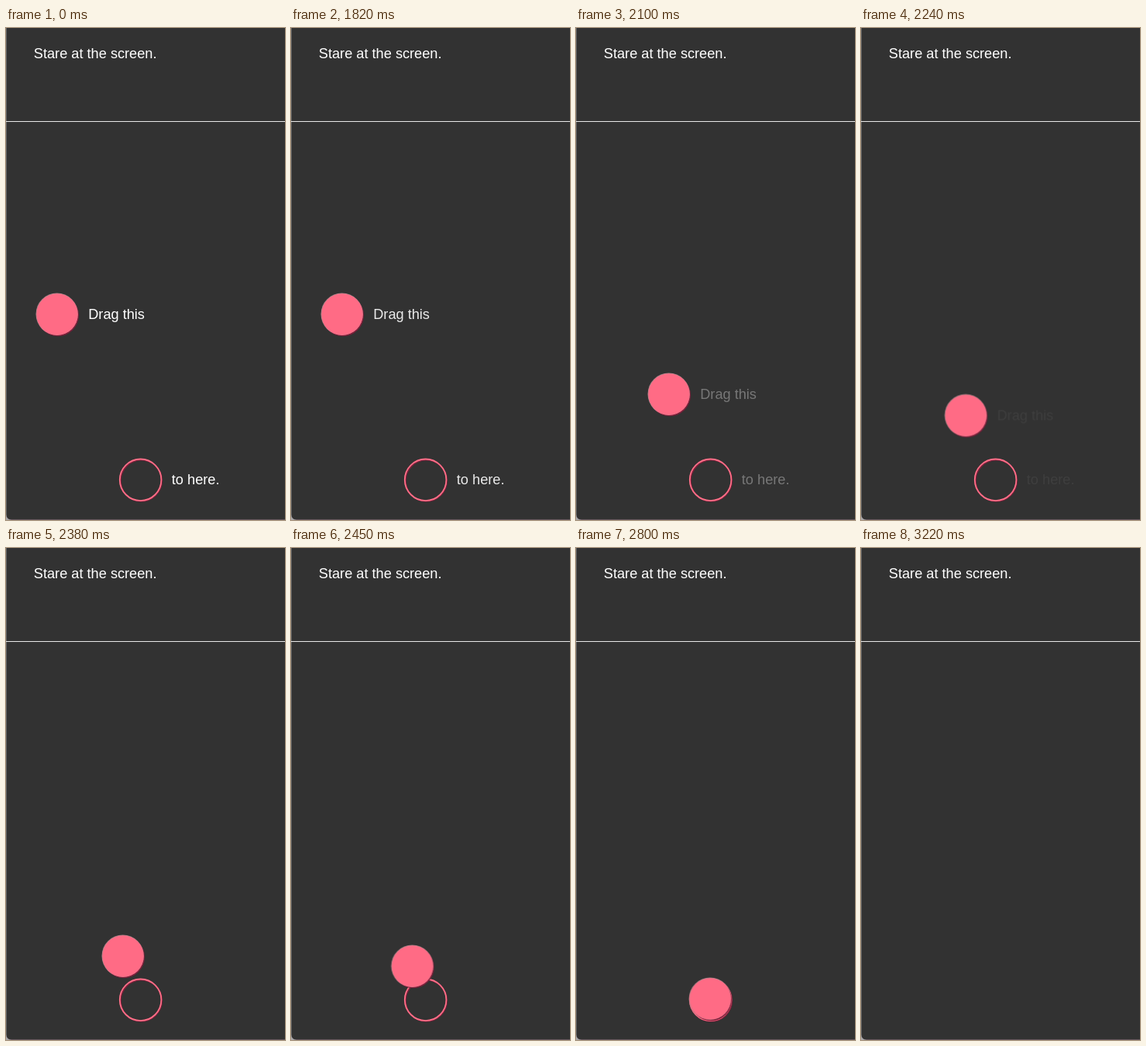
Recreate the animation shown at these times as an HTML page. Size 360 by 634 pixels, loop 3.64 s.

```html
<!DOCTYPE html>
<html lang="en">
<head>
<meta charset="utf-8">
<title>Drag prompt</title>
<style>
  html, body { margin: 0; width: 100%; height: 100%; overflow: hidden; background: #323232; }
  svg { display: block; width: 100%; height: 100%; }
  text { font: 18.2px "Liberation Sans", Arial, Helvetica, sans-serif; fill: #fff; }

  .disc, .label, .stage { animation: 3640ms infinite; }
  .disc { animation-name: drag; }
  .label { animation-name: fade; }
  .stage { animation-name: clear; }

  /* The picture advances every 70 ms, so each leg is split into that many steps. */
  @keyframes drag {
    0%, 50% { transform: translate(66px, 369px); animation-timing-function: steps(2); }
    53.846% { transform: translate(93px, 422px); animation-timing-function: steps(2); }
    57.692% { transform: translate(120px, 472px); animation-timing-function: steps(3); }
    63.461% { transform: translate(143px, 513px); animation-timing-function: steps(1); }
    65.384% { transform: translate(151px, 526px); animation-timing-function: steps(3); }
    71.153% { transform: translate(168px, 565px); animation-timing-function: steps(1); }
    73.076% { transform: translate(171px, 573px); animation-timing-function: steps(1); }
    74.999% { transform: translate(172.5px, 578px); animation-timing-function: steps(1); }
    76.922% { transform: translate(173.3px, 581px); animation-timing-function: steps(1); }
    78.845%, 100% { transform: translate(173.7px, 582.3px); }
  }
  @keyframes fade {
    0% { opacity: 1; animation-timing-function: step-end; }
    49.999% { opacity: .9; animation-timing-function: steps(6); }
    61.538% { opacity: .06; animation-timing-function: step-end; }
    63.461%, 100% { opacity: 0; }
  }
  @keyframes clear {
    0% { opacity: 1; animation-timing-function: step-end; }
    88.461%, 100% { opacity: 0; }
  }
</style>
</head>
<body>
<svg viewBox="0 0 360 634" preserveAspectRatio="none">
  <rect width="360" height="634" fill="#323232"/>
  <path d="M.5 0V634" stroke="#686868"/>
  <path d="M0 633.5H360" stroke="#65565c"/>
  <path d="M0 627Q1 633 7 634H0Z" fill="#aaa6a8"/>
  <path d="M0 120.5H360" stroke="#e9e9e9" stroke-width="1.2"/>
  <text x="35.8" y="39">Stare at the screen.</text>

  <g class="stage">
    <g fill="none" stroke-width="1.8">
      <circle cx="174.5" cy="583.3" r="26.6" stroke="#7c1f3a"/>
      <circle cx="173.6" cy="582.3" r="26.8" stroke="#ff6f88"/>
    </g>
    <text class="label" x="213.8" y="588">to here.</text>
    <g class="disc">
      <circle cx="1" cy="1.2" r="27" fill="#7c1f3a"/>
      <circle cx="-.3" cy="-.3" r="27.2" fill="#a9858a"/>
      <circle r="26.7" fill="#ff6b85"/>
      <text class="label" x="40.2" y="5.5">Drag this</text>
    </g>
  </g>
</svg>
</body>
</html>
```
